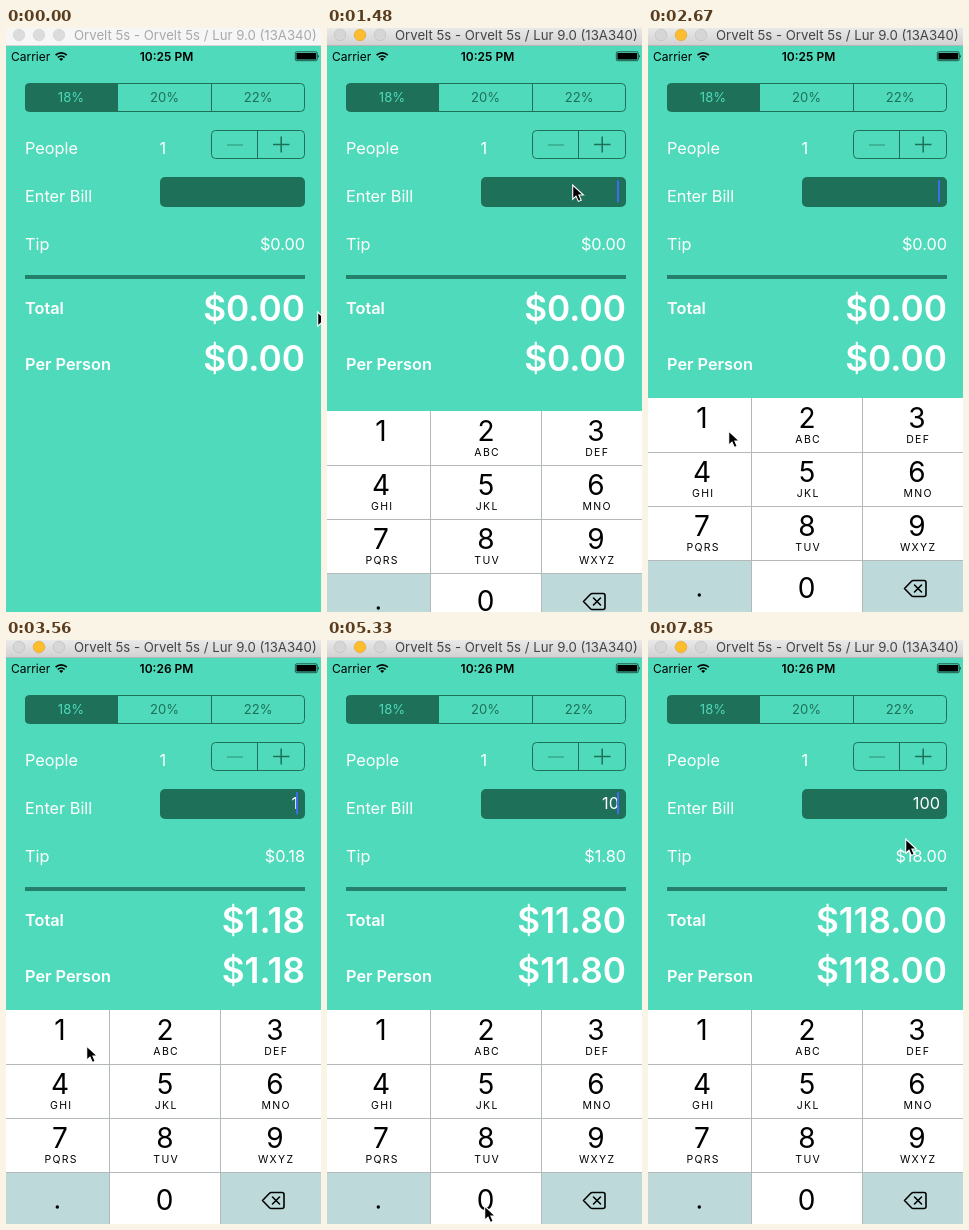
These frames come from a looping animation (315 px wide and 584 px high, 7.99 s). An HTML page:

```html
<!DOCTYPE html>
<html lang="en">
<head>
<meta charset="utf-8">
<title>Tip calculator</title>
<style>
  :root { --mint: #4fdbbb; --dark: #1e7059; --key: #bdd9da; }
  html, body { margin: 0; width: 100%; height: 100%; overflow: hidden; background: var(--mint); }
  svg { display: block; width: 315px; height: 584px; font-family: Inter, Roboto, "Liberation Sans", sans-serif; }
  text { white-space: pre; }
  .mid { text-anchor: middle; }
  .end { text-anchor: end; }
  .label { font-size: 16.3px; fill: #fff; }
  .strong { font-weight: 600; }
  .sum { font-size: 35.2px; font-weight: 600; fill: #fff; text-anchor: end; }
  .bar { font-size: 12px; }
  .head { font-size: 13.2px; }
  .seg { font-size: 13.1px; fill: var(--dark); text-anchor: middle; }
  .line { fill: none; stroke: var(--dark); }
  .digit { font-size: 28px; text-anchor: middle; }
  .abc { font-size: 10.5px; letter-spacing: 1.3px; text-anchor: middle; }
  .press { fill: var(--key); }

  /* everything shares one clock */
  .a { animation: 7990ms step-end infinite; }
  .idle { animation-name: idle; }
  .active { animation-name: active; }
  .am { animation-name: before; }
  .pm { animation-name: after; }
  .pad { animation-name: slide; }
  .caret { animation-name: blink; }
  .one { animation-name: one; }
  .zero { animation-name: zero; }
  .v0 { animation-name: v0; }
  .v1 { animation-name: v1; }
  .v2 { animation-name: v2; }
  .v3 { animation-name: v3; }
  .cursor { animation-name: move; }

  @keyframes idle { 0% { opacity: 1 } 12.87%, 100% { opacity: 0 } }
  @keyframes active { 0% { opacity: 0 } 12.87%, 100% { opacity: 1 } }
  @keyframes before { 0% { opacity: 1 } 35.14%, 100% { opacity: 0 } }
  @keyframes after { 0% { opacity: 0 } 35.14%, 100% { opacity: 1 } }
  @keyframes slide {
    0% { transform: translateY(214px) }
    16.6% { transform: translateY(108px) }
    18.5% { transform: translateY(13px) }
    20.25% { transform: translateY(1px) }
    22.1%, 100% { transform: translateY(0) }
  }
  @keyframes blink {
    0%, 24%, 37%, 50%, 81.55%, 94.45%, 100% { opacity: 0 }
    16.6%, 31.5%, 42.6%, 57.4%, 88.95% { opacity: 1 }
  }
  @keyframes one { 0%, 42.6%, 100% { opacity: 0 } 40.75% { opacity: 1 } }
  @keyframes zero { 0%, 64.8%, 74.05%, 100% { opacity: 0 } 62.9%, 72.2% { opacity: 1 } }
  @keyframes v0 { 0% { opacity: 1 } 42.6%, 100% { opacity: 0 } }
  @keyframes v1 { 0%, 64.8%, 100% { opacity: 0 } 42.6% { opacity: 1 } }
  @keyframes v2 { 0%, 74.05%, 100% { opacity: 0 } 64.8% { opacity: 1 } }
  @keyframes v3 { 0% { opacity: 0 } 74.05%, 100% { opacity: 1 } }
  @keyframes move {
    0% { transform: translate(311px, 283px); animation-timing-function: steps(3) }
    5.55% { transform: translate(262px, 184px); animation-timing-function: steps(2) }
    9.25%, 20.2% { transform: translate(245px, 156px); animation-timing-function: steps(5) }
    29.6% { transform: translate(84px, 390px); animation-timing-function: steps(2) }
    33.35% { transform: translate(80px, 402px); animation-timing-function: steps(2) }
    37%, 44.5% { transform: translate(80px, 405px); animation-timing-function: steps(5) }
    53.65%, 81.5% { transform: translate(157px, 565px); animation-timing-function: steps(5) }
    90.8% { transform: translate(302px, 235px) }
    94.45% { transform: translate(304px, 228px) }
    96.3% { transform: translate(275px, 206px) }
    98.2%, 100% { transform: translate(257px, 198px) }
  }
</style>
</head>
<body>
<svg viewBox="0 0 315 584">
  <defs>
    <linearGradient id="chrome" x2="0" y2="1">
      <stop stop-color="#e9e9e9"/><stop offset="1" stop-color="#d1d1d1"/>
    </linearGradient>
  </defs>
  <rect width="315" height="584" fill="var(--mint)"/>

  <!-- window title -->
  <g class="a idle">
    <rect width="315" height="18" fill="#f6f6f6"/>
    <rect y="17" width="315" height="1" fill="#d4d4d4"/>
    <g fill="#dcdcdc" stroke="#d0d0d0" stroke-width=".6">
      <circle cx="13" cy="7" r="5.8"/><circle cx="33" cy="7" r="5.8"/><circle cx="53" cy="7" r="5.8"/>
    </g>
    <text class="head" x="68" y="12" fill="#a9a9a9">Orvelt 5s - Orvelt 5s / Lur 9.0 (13A340)</text>
  </g>
  <g class="a active">
    <rect width="315" height="18" fill="url(#chrome)"/>
    <rect y="17" width="315" height="1" fill="#b4b4b4"/>
    <g fill="#d6d6d6" stroke="#bdbdbd" stroke-width=".6">
      <circle cx="13" cy="7" r="5.8"/><circle cx="53" cy="7" r="5.8"/>
      <circle cx="33" cy="7" r="5.8" fill="#fdbd2e" stroke="#e0a02a"/>
    </g>
    <text class="head" x="68" y="12" fill="#444">Orvelt 5s - Orvelt 5s / Lur 9.0 (13A340)</text>
  </g>

  <!-- status bar -->
  <text class="bar" x="5" y="32.5">Carrier</text>
  <g fill="none" stroke="#000" stroke-width="1.7">
    <path d="M49.6 27.2a8 8 0 0 1 11.2 0M51.8 29.5a4.9 4.9 0 0 1 6.8 0"/>
    <path d="M55.2 33l-2-2.1a2.9 2.9 0 0 1 4 0z" fill="#000" stroke="none"/>
  </g>
  <g class="bar strong mid">
    <text class="a am" x="160.5" y="32.5">10:25 PM</text>
    <text class="a pm" x="160.5" y="32.5">10:26 PM</text>
  </g>
  <rect x="289.3" y="23.8" width="22" height="8.9" rx="1.6" fill="none" stroke="#000" stroke-width=".6"/>
  <rect x="290.4" y="24.9" width="19.8" height="6.7" rx=".6"/>
  <path d="M312.2 26.5q1.4 1.7 0 3.4z"/>

  <!-- tip rate -->
  <path d="M112 55.5H23a4 4 0 0 0-4 4v20a4 4 0 0 0 4 4h89z" fill="var(--dark)"/>
  <rect class="line" x="19.5" y="55.5" width="279" height="28" rx="4"/>
  <path class="line" d="M205.5 55.5v28"/>
  <text class="seg" x="65" y="74" style="fill:var(--mint)">18%</text>
  <text class="seg" x="158.6" y="74">20%</text>
  <text class="seg" x="252.2" y="74">22%</text>

  <!-- stepper -->
  <rect class="line" x="205.5" y="102.5" width="93" height="28" rx="4"/>
  <path class="line" d="M251.5 102.5v28"/>
  <path class="line" d="M221 117h16" stroke-width="1.4" opacity=".5"/>
  <path class="line" d="M267 116.5h16.5M275.2 108.5v16" stroke-width="1.5"/>

  <g class="label">
    <text x="19" y="126">People</text>
    <text x="153.5" y="126">1</text>
    <text x="19" y="174">Enter Bill</text>
    <text x="19" y="222">Tip</text>
    <text class="strong" x="19" y="286">Total</text>
    <text class="strong" x="19" y="342">Per Person</text>
  </g>
  <rect x="154" y="149" width="145" height="30" rx="5" fill="var(--dark)"/>
  <rect x="19" y="247" width="280" height="4" fill="#24806a"/>

  <g id="values"></g>
  <rect class="a caret" x="290" y="152" width="2" height="22.5" rx="1" fill="#426bf2"/>

  <!-- keypad -->
  <g class="a pad">
    <rect y="370" width="315" height="214" fill="#fff"/>
    <path d="M0 532h103.5v52H0zM214.5 532H315v52H214.5z" fill="var(--key)"/>
    <rect class="a press one" y="370" width="103.5" height="54"/>
    <rect class="a press zero" x="103.5" y="532" width="111" height="52"/>
    <path d="M0 424.5h315M0 478.5h315M0 532.5h315M103.5 370v214M214.5 370v214" stroke="#b3b9b9" fill="none"/>
    <g id="keys"></g>
    <circle cx="51.3" cy="567" r="1.7"/>
    <g fill="none" stroke="#000" stroke-width="1.6" stroke-linejoin="round" stroke-linecap="round">
      <path d="M256.5 560.5l7-7.2q.7-.8 1.8-.8H276a2 2 0 0 1 2 2v12a2 2 0 0 1-2 2h-10.7q-1.1 0-1.8-.8z"/>
      <path d="M266.5 557l7 7m0-7l-7 7"/>
    </g>
  </g>

  <g class="a cursor">
    <path d="M.7 1v14.2l3.3-3.1 2.4 5.3 2.8-1.2-2.3-5.2h4.5z" stroke="#fff" stroke-width="1.1"/>
  </g>
</svg>
<script>
  const text = (cls, x, y, s) => `<text class="${cls}" x="${x}" y="${y}">${s}</text>`;
  const money = n => '$' + n.toFixed(2);

  // one group per typed amount, switched by its own keyframes
  document.getElementById('values').innerHTML = ['', 1, 10, 100].map((bill, i) => {
    const tip = bill * 0.18, total = money(bill * 1.18);
    return `<g class="a v${i}">` +
      text('label end', 292, 169, bill) +
      text('label end', 299, 222, money(tip)) +
      text('sum', 299, 293, total) +
      text('sum', 299, 343, total) + '</g>';
  }).join('');

  const cols = [54, 159, 269];
  const letters = ['', 'ABC', 'DEF', 'GHI', 'JKL', 'MNO', 'PQRS', 'TUV', 'WXYZ'];
  document.getElementById('keys').innerHTML = letters.map((abc, i) => {
    const x = cols[i % 3], y = 400 + 54 * Math.floor(i / 3);
    return text('digit', x, y, i + 1) + text('abc', x + 1.2, y + 15, abc);
  }).join('') + text('digit', 158.5, 569.5, 0);
</script>
</body>
</html>
```
